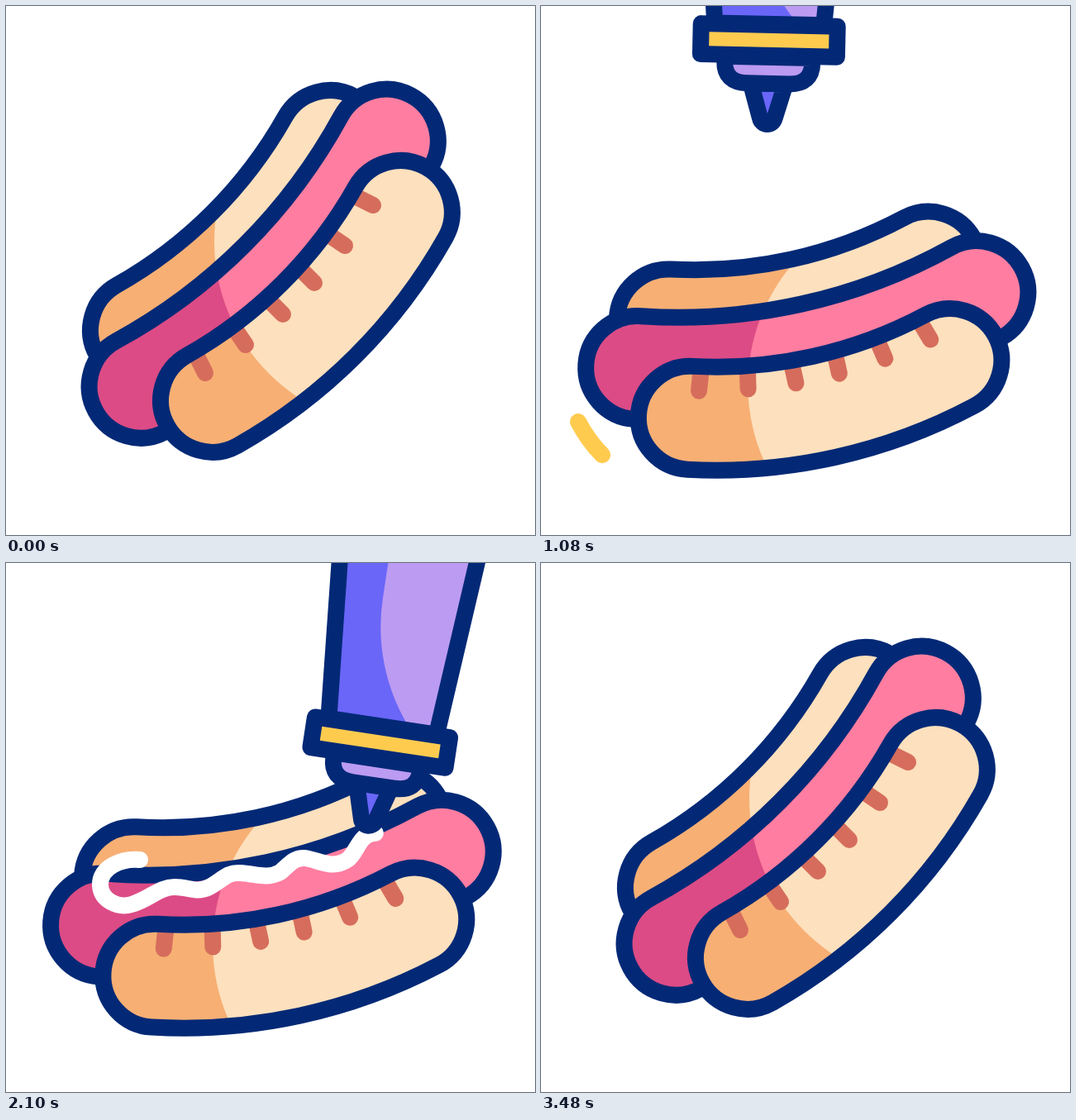
Write an HTML page with a canvas that moves like this. It is 640 px wide and 640 px high and loops after 3.6 s.

```html
<!DOCTYPE html>
<html lang="en">
<head>
<meta charset="utf-8">
<title>Hot dog</title>
<style>
html, body { margin: 0; height: 100%; overflow: hidden; background: #fff; }
canvas { display: block; width: 100vw; height: 100vh; }
</style>
</head>
<body>
<canvas width="640" height="640"></canvas>
<script>
const ctx = document.querySelector('canvas').getContext('2d');
const LOOP = 3600, RAD = Math.PI / 180;
const NAVY = '#032976', YELLOW = '#ffcb4f', CREAM = '#fde0bd', TAN = '#f7af74',
  PINK = '#ff7da0', ROSE = '#dc4b85', CHAR = '#d66d5c', VIOLET = '#6a66f8', LILAC = '#bc9bf2';
const REST = { angle: 32.8 * RAD, x: 4.3, y: 85.2 };

// Smooth 0..1 progress of t between a and b
const ramp = (t, a, b) => {
  const s = Math.min(1, Math.max(0, (t - a) / (b - a)));
  return s * s * (3 - 2 * s);
};
const mix = (a, b, p) => a + (b - a) * p;

// Bent capsule across the diagonal, centred on (mid, mid)
function capsule(mid, radius, halfChord) {
  const r = 62.5, q = Math.PI / 4, h = Math.asin(halfChord / radius);
  const c = mid - radius * Math.cos(h) * Math.SQRT1_2;
  const at = f => [c + radius * Math.cos(f), c + radius * Math.sin(f)];
  const p = new Path2D();
  p.arc(c, c, radius + r, q - h, q + h);
  p.arc(...at(q + h), r, q + h, q + h + Math.PI);
  p.arc(c, c, radius - r, q + h, q - h, true);
  p.arc(...at(q - h), r, q - h + Math.PI, q - h + 2 * Math.PI);
  p.closePath();
  return p;
}

function curve(d) {
  const el = document.createElementNS('http://www.w3.org/2000/svg', 'path');
  el.setAttribute('d', d);
  const length = el.getTotalLength();
  return { path: new Path2D(d), length, at: p => el.getPointAtLength(p * length) };
}

const backBun = capsule(278.4, 600, 161);
const sausage = capsule(311.7, 743, 210);
const frontBun = capsule(363.4, 600, 161);
const light = new Path2D();
light.arc(478, 285, 226, 0, 7);
const grill = new Path2D();
for (const [a, b, c, d] of [[444, 241, 420, 229], [410, 290, 388, 275], [373, 335, 355, 317]]) {
  grill.moveTo(a, b); grill.lineTo(c, d);
  grill.moveTo(b, a); grill.lineTo(d, c);
}

const swoosh = curve('M243 578C200 592 155 592 119 575C85 558 62 535 45 503');
const mayo = curve('M162 359C140 357 113 368 114 390C115 408 135 418 152 413C175 406 185 392 204 392' +
  'C222 392 230 400 246 392C262 384 266 374 283 375C303 376 315 383 332 374C345 362 350 356 362 357' +
  'C380 360 395 371 413 359C424 352 427 329 444 327C460 325 475 333 495 326C520 316 531 302 532 281');

// Bottle parts, with the nozzle tip at the origin
const bottle = new Path2D('M-66-112L-107-620H107L66-112Z');
const bottleLight = new Path2D('M-23-620V-268A232 232 0 0 0 30-118V-100H200V-620Z');
const nozzle = new Path2D('M-21-40L-8.8 2A9 9 0 0 0 8.8 2L21-40Z');
const dome = new Path2D('M-53-72V-66Q-53-40-25-40H25Q53-40 53-66V-72Z');
const collar = new Path2D('M-82.5-111H82.5V-74H-82.5Z');

function stroke(path, color) {
  ctx.strokeStyle = color;
  ctx.stroke(path);
}

function fill(path, color) {
  ctx.fillStyle = color;
  ctx.fill(path);
}

function outlined(path, color, inside) {
  ctx.save();
  ctx.clip(path);
  fill(path, color);
  if (inside) inside();
  ctx.restore();
  stroke(path, NAVY);
}

function trimmed(line, from, to, color) {
  if (to <= from) return;
  ctx.save();
  ctx.setLineDash([line.length * (to - from), 9999]);
  ctx.lineDashOffset = -line.length * from;
  stroke(line.path, color);
  ctx.restore();
}

function pose(t) {
  const back = 1 - ramp(t, 3040, 3480);
  const hop = -48 * ramp(t, 140, 530);
  return {
    angle: REST.angle * ramp(t, 420, 1120) * back,
    x: REST.x * ramp(t, 140, 1120) * back,
    y: mix(hop, REST.y, ramp(t, 530, 1120)) * back
  };
}

function drawHotDog(t, squeezed) {
  const { angle, x, y } = pose(t);
  ctx.save();
  ctx.translate(320 + x, 320 + y);
  ctx.rotate(angle);
  ctx.translate(-320, -320);
  outlined(backBun, TAN, () => fill(light, CREAM));
  outlined(sausage, ROSE, () => fill(light, PINK));
  outlined(frontBun, TAN, () => {
    fill(light, CREAM);
    stroke(grill, CHAR);
  });
  // The sauce is laid out in the resting pose
  ctx.translate(320, 320);
  ctx.rotate(-REST.angle);
  ctx.translate(-320 - REST.x, -320 - REST.y);
  const sink = ramp(t, 2300, 2420);
  ctx.translate(3 * sink, 7 * sink);
  trimmed(mayo, ramp(t, 2980, 3200), squeezed, '#fff');
  ctx.restore();
}

function bottlePose(t, squeezed) {
  if (t < 1400) {
    const swing = ramp(t, 1030, 1400);
    return [mix(280, 161, swing), mix(-20, 320, ramp(t, 800, 1400)), 23.8 * swing];
  }
  const tip = mayo.at(squeezed);
  const leave = ramp(t, 2640, 3050);
  return [
    mix(tip.x - 1 - 8 * squeezed, 402, leave),
    mix(tip.y - 39 + 26 * squeezed, -25, leave),
    mix(23.8 - 19 * squeezed, 0, leave)
  ];
}

function drawBottle(t, squeezed) {
  if (t < 800 || t > 3050) return;
  const [x, y, angle] = bottlePose(t, squeezed);
  ctx.save();
  ctx.translate(x, y);
  ctx.rotate(angle * RAD);
  outlined(bottle, VIOLET, () => fill(bottleLight, LILAC));
  outlined(nozzle, VIOLET);
  outlined(dome, LILAC);
  outlined(collar, YELLOW);
  ctx.restore();
}

function frame(now) {
  const t = now % LOOP;
  const squeezed = ramp(t, 1460, 2360);
  ctx.fillStyle = '#fff';
  ctx.fillRect(0, 0, 640, 640);
  ctx.lineWidth = 20;
  ctx.lineCap = ctx.lineJoin = 'round';
  trimmed(swoosh, ramp(t, 720, 1235), ramp(t, 420, 945), YELLOW);
  drawHotDog(t, squeezed);
  drawBottle(t, squeezed);
  requestAnimationFrame(() => frame(performance.now()));
}
frame(performance.now());
</script>
</body>
</html>
```
